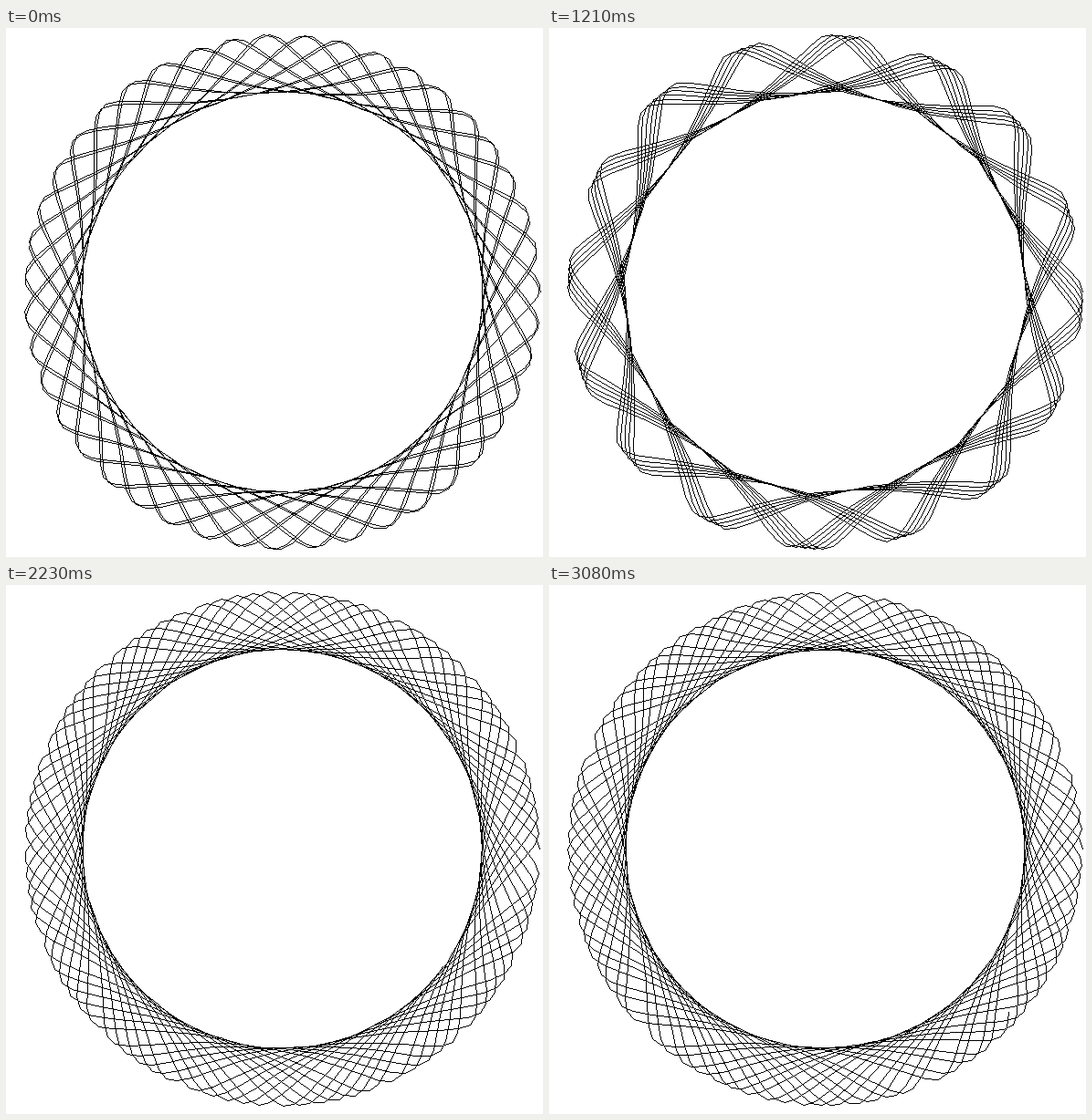
Animation of 588 by 580 pixels, one loop 3.2 s. Source, as an HTML page with a canvas:

```html
<!DOCTYPE html>
<html lang="en">
<head>
<meta charset="utf-8">
<title>Spirograph</title>
<style>
  html, body { margin: 0; width: 100%; height: 100%; overflow: hidden; background: #fff; }
  canvas { display: block; }
</style>
</head>
<body>
<canvas id="stage" width="588" height="580"></canvas>
<script>
const W = 588, H = 580;
const LOOP = 3200, FIRST = 50, HOLD = 94.4, NOTCHES = 33; // ms, ms, ms, growth steps
const CX = 302, CY = 289;
const RING = 308, PEN = 32;           // fixed ring radius, pen offset
const STEP = 0.1, COUNT = 999;        // radians per segment, segments
const ctx = document.getElementById('stage').getContext('2d');
const image = ctx.createImageData(W, H);
const pixels = new Uint32Array(image.data.buffer);

// Crisp one-pixel line without smoothing
function line(x, y, x1, y1) {
  const dx = Math.abs(x1 - x), dy = -Math.abs(y1 - y);
  const sx = x < x1 ? 1 : -1, sy = y < y1 ? 1 : -1;
  let err = dx + dy;
  for (;;) {
    pixels[y * W + x] = 0xff000000;
    if (x === x1 && y === y1) return;
    const e = 2 * err;
    if (e >= dy) { err += dy; x += sx; }
    if (e <= dx) { err += dx; y += sy; }
  }
}

// A wheel rolling inside the ring; it grows a little with every notch
function draw(notch) {
  const lobe = 67 + 0.0308 * notch;   // degrees between successive lobes
  const wheel = RING * lobe / 360;
  const arm = RING - wheel, ratio = arm / wheel;
  const point = t => [
    Math.round(CX + arm * Math.cos(t) + PEN * Math.cos(ratio * t)),
    Math.round(CY - arm * Math.sin(t) + PEN * Math.sin(ratio * t))
  ];
  pixels.fill(0xffffffff);
  let last = point(0);
  for (let i = 1; i <= COUNT; i++) {
    const next = point(i * STEP);
    line(...last, ...next);
    last = next;
  }
  ctx.putImageData(image, 0, 0);
}

let shown = -1;
const start = performance.now();
function tick() {
  const time = (performance.now() - start) % LOOP;
  const notch = Math.min(NOTCHES, Math.floor((time - FIRST) / HOLD) + 1);
  if (notch !== shown) draw(shown = notch);
  requestAnimationFrame(tick);
}
tick();
</script>
</body>
</html>
```
